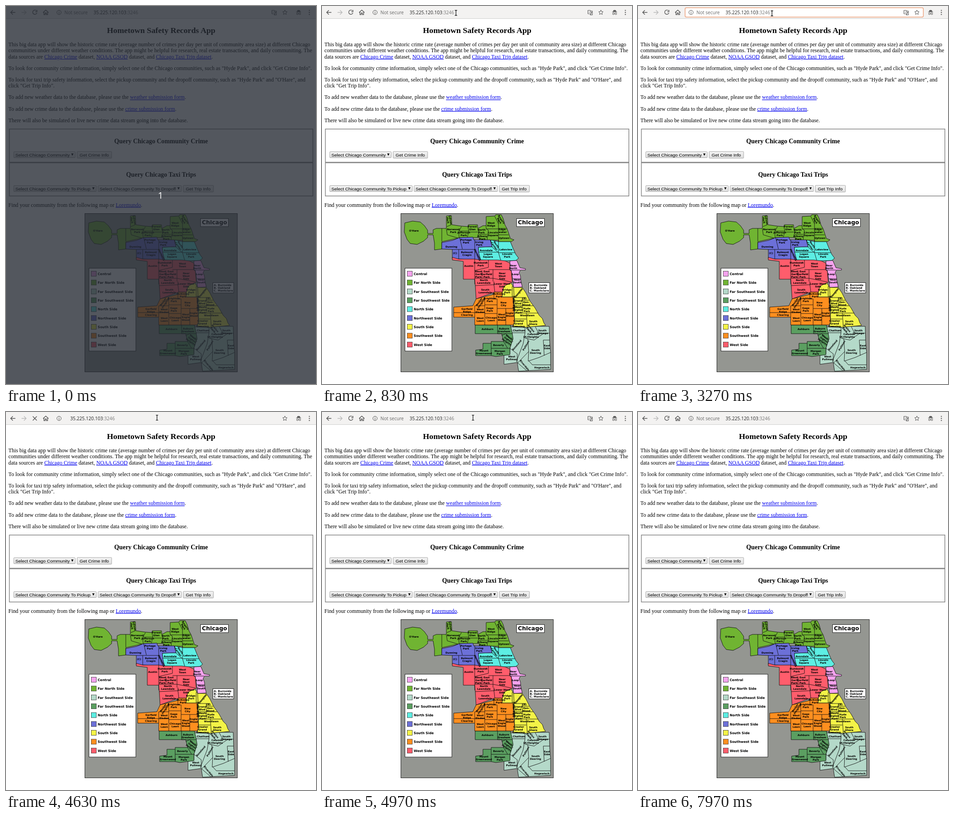
An HTML page that plays this animation: 678 px wide and 826 px high, repeating every 8 s.

```html
<!DOCTYPE html>
<html lang="en">
<head>
<meta charset="utf-8">
<title>Hometown Safety Records App</title>
<style>
  html, body { margin: 0; width: 678px; height: 826px; overflow: hidden; background: #fff; }
  svg { display: block; }
  .serif { font: 11.84px "Liberation Serif", serif; }
  .heading { font: bold 13.85px "Liberation Serif", serif; text-anchor: middle; }
  .title { font-size: 17.76px; }
  .link { fill: #00e; text-decoration: underline; }
  .form { font: 9.87px "Liberation Sans", sans-serif; }
  .bar { font: 10.1px "Open Sans", sans-serif; }
  .icon { fill: none; stroke: #555; stroke-width: 1.4; }
  .map { font: bold 5.5px "DejaVu Sans", sans-serif; }
  .mid { text-anchor: middle; }
</style>
</head>
<body>
<svg width="678" height="826" viewBox="0 0 678 826">
  <defs>
    <linearGradient id="face" x2="0" y2="1"><stop stop-color="#f5f5f5"/><stop offset="1" stop-color="#dedede"/></linearGradient>
    <clipPath id="clip"><rect id="selection" x="191" y="7.5" width="98.5" height="13.5"/></clipPath>
  </defs>
  <rect width="678" height="27" fill="#f3f2f1"/>
  <path d="M0 27.5H678" stroke="#d0cfce"/>
  <rect id="ring" x="103" y="3.7" width="521" height="20.6" rx="3" fill="#fff" stroke="#eda47f" stroke-width="1.5"/>
  <g class="icon">
    <path d="M20.5 14H10.5M15 9.2L10.2 14 15 18.8"/>
    <path d="M34 14H44M39.3 9.2L44.1 14 39.3 18.8" stroke="#bbb"/>
    <path id="reload" d="M66.6 10.4A4.7 4.7 0 1 0 67.6 15M67.7 8.7V12.6H63.8"/>
    <path id="stop" d="M58.6 9.6L67.4 18.4M67.4 9.6L58.6 18.4"/>
    <path d="M81 14.3L87 9 93 14.3M83 13V18.8H85.7V15.2H88.3V18.8H91V13"/>
    <circle cx="116" cy="14" r="4.7" stroke-width="1"/>
    <path d="M116 13.3V17M116 11V12.2" stroke-width="1.1"/>
    <g id="translate" stroke-width="1">
      <path d="M581.5 9.5H587L589 17H581.5ZM587.5 11H591.5V19.5H586L589 17"/>
      <path d="M583 13.3H586.5M588.5 13.5H591M590 13.5L588.8 16" stroke-width=".8"/>
    </g>
    <path d="M610 8.8L611.4 12.2 615 12.5 612.3 14.9 613.1 18.5 610 16.6 606.9 18.5 607.7 14.9 605 12.5 608.6 12.2Z" stroke-width="1"/>
    <path d="M634.5 13.2H645.5M636.5 12L638 9.3H642L643.5 12Z" fill="#555" stroke-width="1"/>
    <path d="M639 16.8H641" stroke-width="1"/>
    <circle cx="637.3" cy="17" r="1.8" stroke-width="1"/><circle cx="642.7" cy="17" r="1.8" stroke-width="1"/>
    <path d="M663.5 9.6V9.61M663.5 14V14.01M663.5 18.4V18.41" stroke-width="2.4" stroke-linecap="round"/>
  </g>
  <g class="bar">
    <text id="secure" x="127.8" y="17.6" fill="#666">Not secure</text>
    <text id="address" x="191.6" y="17.6" fill="#222">35.225.120.103<tspan fill="#777">:3246</tspan></text>
    <g id="selected" clip-path="url(#clip)">
      <rect x="191" y="7.5" width="98.5" height="13.5" fill="#f07746"/>
      <text x="191.6" y="17.6" fill="#fff">35.225.120.103:3246</text>
    </g>
  </g>
  <g id="page"></g>
  <g id="map"></g>
  <g id="arrow"><path d="M0 0V12.6L3 9.9 5 14.2 7 13.3 5.1 9.1H9Z" fill="#fff" stroke="#111"/></g>
  <g id="beam" fill="none"><path d="M-2.7-5.5H2.7M0-5.5V5.5M-2.7 5.5H2.7" stroke="#fff" stroke-width="2.6"/><path d="M-2.5-5.5H2.5M0-5.5V5.5M-2.5 5.5H2.5" stroke="#111" stroke-width="1.3"/></g>
  <g id="dim">
    <rect width="678" height="826" fill="#252b33" opacity=".79"/>
    <text class="mid" x="338" y="421" fill="#fff" style="font:20px 'Open Sans',sans-serif">1</text>
  </g>
</svg>
<script>
const $ = id => document.getElementById(id);
const link = text => `<tspan class="link">${text}</tspan>`;
const text = (x, y, cls, content) => `<text x="${x}" y="${y}" class="${cls}">${content}</text>`;
const box = (x, y, w, h, fill, stroke, extra = '') =>
  `<rect x="${x}" y="${y}" width="${w}" height="${h}" fill="${fill}" stroke="${stroke}" ${extra}/>`;

// Page text: each paragraph is a list of lines
const paragraphs = [
  ['This big data app will show the historic crime rate (average number of crimes per day per unit of community area size) at different Chicago',
   'communities under different weather conditions. The app might be helpful for research, real estate transactions, and daily communiting. The',
   `data sources are ${link('Chicago Crime')} dataset, ${link('NOAA GSOD')} dataset, and ${link('Chicago Taxi Trip dataset')}.`],
  ['To look for community crime information, simply select one of the Chicago communities, such as "Hyde Park", and click "Get Crime Info".'],
  ['To look for taxi trip safety information, select the pickup community and the dropoff community, such as "Hyde Park" and "O\'Hare", and',
   'click "Get Trip Info".'],
  [`To add new weather data to the database, please use the ${link('weather submission form')}.`],
  [`To add new crime data to the database, please use the ${link('crime submission form')}.`],
  ['There will also be simulated or live new crime data stream going into the database.']
];
let page = text(339.4, 58.5, 'heading title', 'Hometown Safety Records App');
let baseline = 88;
for (const lines of paragraphs) {
  lines.forEach((line, i) => page += text(5.3, baseline + i * 13.32, 'serif', line));
  baseline += (lines.length - 1) * 13.32 + 25.16;
}
const control = (x, y, w, label, menu) =>
  box(x, y + (menu ? .5 : 0), w, menu ? 13 : 14.5, 'url(#face)', '#a5a5a5', 'rx="1"') +
  text(x + (menu ? 3.5 : 5.5), y + 10.6, 'form', label) +
  (menu ? `<path d="M${x + w - 9} ${y + 4.2}h5.2l-2.6 5z"/>` : '');
const panel = (y, heading) =>
  box(7.4, y, 663.8, 72.6, 'none', '#858585', 'stroke-width="1.5"') + text(339.3, y + 30.7, 'heading', heading);
page += panel(268.8, 'Query Chicago Community Crime') + panel(342.6, 'Query Chicago Taxi Trips') +
  control(17, 318, 134.5, 'Select Chicago Community', true) + control(155.5, 318, 75.5, 'Get Crime Info') +
  control(17, 392, 180.5, 'Select Chicago Community To Pickup', true) +
  control(201.3, 392, 182.5, 'Select Chicago Community To Dropoff', true) +
  control(387.7, 392, 66, 'Get Trip Info') +
  text(5.3, 438.5, 'serif', `Find your community from the following map or ${link('Loremundo')}.`);
$('page').innerHTML = page;

// Map: name, colour, outline, inner borders, labels ("x,y[,angle] line/line")
const areas = [
  ['Central', '#f5a3ee', 'M411 557L426 556 433 572 445 574V577L434 577 431 583 434 590 435 600 438 614 419 615 417 596 414 578 411 577Z',
   'M412 577H433M417 596H434',
   "418,570 Near/North;423,586 Loop;427,601 Near/South"],
  ['Far North Side', '#70b432', 'M181 474L198 470 215 472 224 480 231 490V497H243V489L250 486H272V459L283 458 284 478 305 481 319 482 320 478H340L341 486 352 480H359V460L378 459 380 456H392L396 464 400 478 405 487 412 508 420 511 414 515H386V512L344 511V506H303L262 515V531L246 533V518L243 500H231V506L222 514 208 521 193 519 186 510 180 494Z',
   'M262 486V514M272 487L274 500 300 508M305 482L299 493 300 506M319 481L321 492 318 505M341 486L343 494 340 505M359 480V487L364 490 361 511M359 487H386V460M386 487V515M343 499H361M386 500H408M386 486H404M283 478L273 482M378 460L386 476M299 492H321M321 494H343',
   "201,491 O'Hare;287,491 Norwood/Park;278,468,80 Edison/Park;310,498 Jefferson/Park;329,485 Forest/Glen;349,492 North/Park;370,477 West/Ridge;390,468,55 Rogers/Park;374,498 Lincoln/Square;395,491 Edge-/water;398,507 Uptown;351,506 Albany/Park"],
  ['Far Southeast Side', '#b4d9c9', 'M412 701L440 702 470 700H497L498 735 500 757V794L430 798 427 779 398 783V763L411 760V748L417 727Z',
   'M416 714H444V701M444 714L440 738 425 777M444 726L464 730 484 716M450 727L452 755 428 780 448 797M452 755L451 776 475 768 500 757M484 730L486 764M484 730H498M466 700L474 715H497M446 703L460 718M452 775L460 784H500M411 748L427 760V779',
   "431,709 Chatham;455,706,50 Avalon/Park;482,712 South/Chicago;462,720 Calumet/Heights;445,723 (A);426,741,-50 Roseland;446,742,-60 Pullman;467,755 South/Deering;492,745 East/Side;415,769 West/Pullman;443,785,50 Riverdale;481,790 Hegewisch"],
  ['Far Southwest Side', '#5b9f61', 'M335 697H412L416 714 418 727 411 748V762L380 766 370 764H336V752L352 750V737H370V733H397L393 716H335Z',
   'M384 697V716H416M370 737V764M370 748H411M397 733L406 748M393 720L402 716 418 734',
   "362,706 Ashburn;398,708 Auburn/Gresham;407,729,35 Wash-/ington/Heights;386,741 Beverly;354,756 Mount/Greenwood;389,757 Morgan/Park"],
  ['North Side', '#5deee3', 'M369 511L386 515H412L418 530 424 543 430 551 424 556 400 557 347 555 342 541V527L371 526Z',
   'M342 538H386V515M371 526L386 539H422M369 511L372 527M386 539L391 556',
   "379,523,55 North/Center;402,532 Lakeview;359,534 Avondale;363,545 Logan/Square;405,545 Lincoln/Park"],
  ['Northwest Side', '#6c70d8', 'M262 517L286 512 301 506 330 505 332 511H368L372 526 342 527 343 540 347 555H335L285 552V532L262 531Z',
   'M301 506L307 531M285 532H334V510M299 532V552M334 531V555M334 531L347 555',
   "315,514 Portage/Park;344,519 Irving/Park;283,526 Dunning;291,540 (C);317,541 Belmont/Cragin;340,544,65 Hermosa"],
  ['South Side', '#f3f347', 'M394 613L413 605 419 615H438L446 627 455 645 466 660 475 676 482 683 485 692 489 698 447 702 418 700 421 690V667L419 640 416 636H394Z',
   'M416 612V636M419 615L422 667M419 637H446M438 637V655H421M438 655H462M438 655V671M421 671H473M447 671L449 702M421 684H447M421 637L438 616M438 643H453',
   "405,623 Bridge-/Port;430,627,-50 Douglas;418.5,650,90 Fuller Park;429,647 Grand/Blvd;443,639 (B);447,650 Ken-/Wood;430,664 Wash-/ington/Park;448,664 Hyde/Park;449,676 Woodlawn;430,694 Greater/Grand/Crossing;462,692 South/Shore"],
  ['Southwest Side', '#ff8f1f', 'M288 658L330 655 337 640 376 630V625H394V636H418L421 690 418 697H334V680H288Z',
   'M288 670H356M356 636V697M334 655V680M356 653H383V697M376 630V640H383V653M383 661H402V697M402 661H420M336 655L356 638M356 672H383M334 655H356',
   "367,642 Brighton/Park;387,632 McKinley/Park;397,651 New/City;346,648,-55 Archer/Heights;317,665 Garfield/Ridge;317,675 Clearing;346,666 West/Elsdon;367,663 Gage/Park;346,685 West/Lawn;370,684 Chicago/Lawn;393,680 West/Engle/Wood;411,674 Engle-/Wood"],
  ['West Side', '#ff5d6c', 'M285 549L299 553 334 553 347 555H384L401 557 411 562V577L414 579 416 604 413 605 398 612 395 625H378L337 640 335 608 334 597H309V558L285 555Z',
   'M334 553V608M334 578L364 571V555M364 576H411M350 578V595M374 576V602M334 595H374L414 603M335 611L376 609 378 625M376 602V610',
   "321,568 Austin;347,564 Humboldt/Park;386,566 West/Town;342,586 West/Garf/Park;360,586 East/Garfield/Park;394,590 Near/West/Side;354,602 North/Lawndale;394,610 Lower West/Side;357,623 South/Lawndale"]
];
const label = entry => {
  const gap = entry.indexOf(' '), [x, y, angle = 0] = entry.slice(0, gap).split(',').map(Number);
  const lines = entry.slice(gap + 1).split('/');
  return `<g transform="translate(${x} ${y}) rotate(${angle})">` +
    lines.map((s, i) => text(0, 2 + (i - (lines.length - 1) / 2) * 5.8, 'mid', s)).join('') + '</g>';
};
let map = box(172.5, 453.5, 333.5, 346, '#949691', '#222');
for (const [, fill, outline, borders] of areas)
  map += `<path d="${outline}" fill="${fill}"/><path d="${outline}${borders}" fill="none" stroke="#111" stroke-width=".9"/>`;
map += areas.map(a => a[4].split(';').map(label).join('')).join('');
map += box(425.5, 464.5, 61, 17.5, '#fff', '#222') + `<g font-size="12.3">${text(456, 477.3, 'mid', 'Chicago')}</g>`;
map += box(452.5, 604.5, 45.5, 22.5, '#fff', '#222') + '<g font-size="5.9">' +
  ['A. Burnside', 'B. Oakland', 'C. Montclare'].map((s, i) => text(454.5, 612.2 + i * 6, '', s)).join('') + '</g>';
map += box(181.5, 573, 102.5, 181, '#fff', '#222') + '<g font-size="7.2">' + areas.map(([name, fill], i) =>
  box(186.5, 579.5 + i * 19.35, 11, 11, fill, '#333', 'stroke-width=".8"') +
  text(200.5, 588 + i * 19.35, '', name)).join('') + '</g>';
$('map').innerHTML = `<g class="map">${map}</g>`;

// Pointer stops: start time, shape, x, y
const stops = [
  [0, ''], [830, 'beam', 293, 15], [2130, 'beam', 216, 14.8], [2230, 'beam', 196, 15],
  [2370, 'beam', 150, 16], [2500, 'beam', 120, 20], [2630, 'beam', 108, 24],
  [2770, 'beam', 119, 32], [2900, 'beam', 200, 24], [3030, 'beam', 293, 16],
  [4100, 'beam', 312, 14], [4200, 'beam', 330.3, 12.3], [5730, 'beam', 329.5, 12.8],
  [5900, 'arrow', 291, 38], [6200, 'arrow', 268, 60], [6330, 'arrow', 249, 78],
  [6500, 'arrow', 207, 155], [6630, 'arrow', 174, 187], [6900, 'arrow', 130, 203], [7030, 'arrow', 99, 213],
  [7170, 'arrow', 86, 222], [7300, 'arrow', 70, 232], [7400, 'arrow', 56, 240],
  [7700, 'arrow', 44, 270], [7830, 'beam', 206, 56.5], [7970, '']
];
const show = (id, on) => $(id).style.display = on ? '' : 'none';

function pointer(t) {
  if (t >= 470 && t < 830) {
    const p = Math.floor((t - 470) / 33) / 11, y = 26 * p - 11;
    return [y > 3 ? 'beam' : 'arrow', 221 + 72 * p, y];
  }
  return stops.findLast(s => s[0] <= t).slice(1);
}

function draw(now) {
  const t = now % 8000, within = (a, b) => t >= a && t < b;
  const loading = within(4630, 4870), stopping = within(4530, 4770);
  show('dim', t < 470);
  show('ring', within(2130, 4630));
  show('selected', within(2130, 3270));
  $('selection').setAttribute('x', t < 2230 ? 217.5 : 191);
  show('stop', stopping);
  show('reload', !stopping);
  show('secure', !loading);
  show('translate', !loading);
  $('address').setAttribute('x', loading ? 140.6 : 191.6);
  show('map', !within(4770, 4900));
  const [shape, x, y] = pointer(t);
  for (const id of ['arrow', 'beam']) {
    show(id, id === shape);
    if (id === shape) $(id).setAttribute('transform', `translate(${x} ${y})`);
  }
  requestAnimationFrame(draw);
}
draw(performance.now());
</script>
</body>
</html>
```
